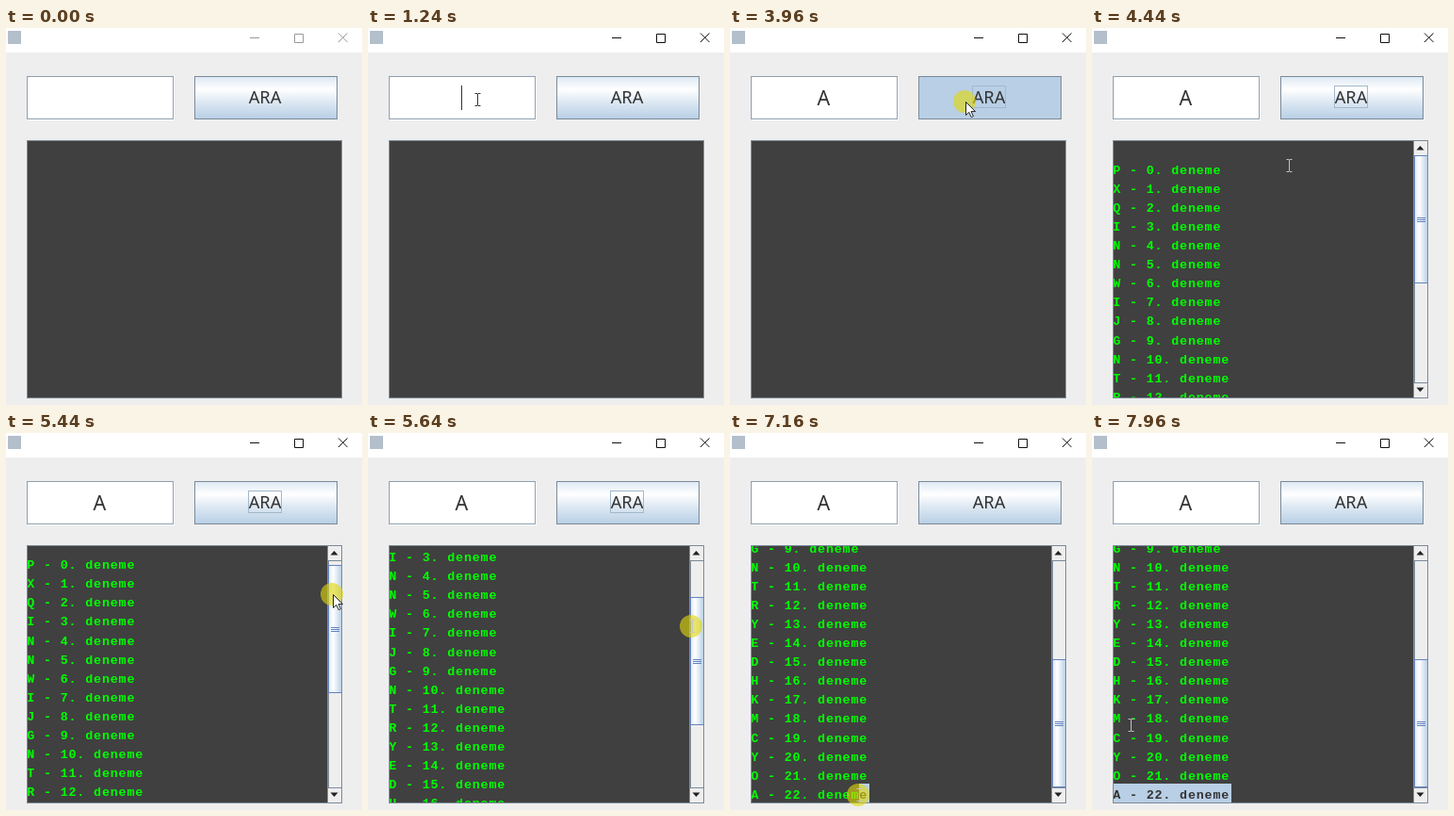
Animation of 378 by 400 pixels, one loop 8000 ms. Source, as an HTML page:

```html
<!DOCTYPE html>
<html lang="tr">
<head>
<meta charset="utf-8">
<title>ARA</title>
<style>
  html, body { margin: 0; width: 100%; height: 100%; overflow: hidden; background: #eee; }
  svg { display: block; width: 378px; height: 400px; }
  rect { shape-rendering: crispEdges; }
  text { white-space: pre; fill: #333; }
  .ui { font-family: "Noto Sans", "Open Sans", sans-serif; text-anchor: middle; }
  .log text { font: bold 13.4px "Liberation Mono", "Courier New", monospace; letter-spacing: .81px; fill: #0f0; }
  .edge { fill: none; stroke: #7a8a99; }
</style>
</head>
<body>
<svg viewBox="0 0 378 400">
  <defs>
    <linearGradient id="face" x2="0" y2="1">
      <stop offset="0" stop-color="#dde8f3"/><stop offset=".3" stop-color="#fff"/>
      <stop offset=".6" stop-color="#dde8f3"/><stop offset="1" stop-color="#b8cfe5"/>
    </linearGradient>
    <linearGradient id="thumbFace">
      <stop offset="0" stop-color="#dde8f3"/><stop offset=".35" stop-color="#fff"/>
      <stop offset="1" stop-color="#b8cfe5"/>
    </linearGradient>
    <clipPath id="view"><rect x="22" y="120" width="319" height="272"/></clipPath>
  </defs>

  <rect width="378" height="400" fill="#eee"/>
  <rect width="378" height="26" fill="#fff"/>
  <rect x="2" y="3" width="14" height="14" fill="#b4bfcc"/>
  <g id="controls" fill="none">
    <path d="M259 10.5h10M306.5 6.5h9v9h-9z"/>
    <path d="M353 5.5l9.5 9.5M362.5 5.5l-9.5 9.5"/>
  </g>

  <rect x="23.5" y="52.5" width="155" height="45" fill="none" stroke="#fff"/>
  <rect x="22.5" y="51.5" width="155" height="45" fill="#fff" stroke="#8f9fae"/>
  <text id="typed" class="ui" x="99.300" y="82" font-size="21.5">A</text>
  <rect id="caret" y="61" width="1" height="26" fill="#333"/>

  <rect id="button" x="200.5" y="51.5" width="151" height="45" stroke="#7a8a99"/>
  <rect id="rollover" x="202" y="53" width="148" height="42" fill="none" stroke="#b8cfe5" stroke-width="2"/>
  <text class="ui" x="275" y="80" font-size="18.200">ARA</text>
  <rect id="focus" x="257.5" y="61.5" width="35" height="23" fill="none" stroke="#a3b8cc"/>

  <rect x="22" y="119" width="335" height="274" fill="#404040"/>
  <g id="output">
    <g clip-path="url(#view)"><g id="log" class="log">
      <rect id="band" y="581" height="21" fill="#b8cfe5"/>
    </g></g>
    <rect x="341" y="120" width="16" height="272" fill="#eee"/>
    <path class="edge" d="M341.5 120v272M342.5 136v240M342 135.5h15M342 376.5h15"/>
    <path d="M344.5 129.5l4-4.5 4 4.5zM344.5 381.5l4 4.5 4-4.5z" fill="#222"/>
    <g id="thumb">
      <rect x="342.5" y="135.5" width="14" height="135" fill="url(#thumbFace)" stroke="#6382bf"/>
      <path d="M345 201.5h9M345 203.5h9M345 205.5h9" stroke="#6382bf"/>
    </g>
  </g>
  <rect class="edge" x="22.5" y="119.5" width="334" height="273"/>

  <g id="pointer">
    <circle id="halo" cx="-1" r="12" fill="#e0d60a" fill-opacity=".62"/>
    <path id="beam" d="M-2.5 -6.5H0l.5 .5 .5 -.5H3.5M.5 -6V6M-2.5 6.5H0l.5 -.5 .5 .5H3.5" fill="none"/>
    <path id="arrow" d="M.5 .5v14l3.300-3.100 2.400 5.200 2.200-1-2.400-5h4.500z" fill="#fff" stroke="#222"/>
  </g>
</svg>
<script>
const LOOP = 8000, STEP = 40, BLINK = 500;
const ROW = 20.1, CHAR = 8.85, LEFT = 22.3, TRAVEL = 104.5;
const ENTER = 120, ACTIVATE = 1120, TYPE = 2640, PUSH = 3960, SEARCH = 4120;
const GRAB = 5360, DROP = 6320, HOLD = 6960, MARK = 7160, FREE = 7640;
const LETTERS = 'PXQINNWIJGNTRYEDHKMCYOA';
const $ = id => document.getElementById(id);

// Each move starts where the one before it ended; a bend makes it an even-paced arc.
const START = { x: 309, y: 383 };
const MOVES = [
  { from: ENTER, to: 920, x: 116, y: 76 },
  { from: 3480, to: PUSH, x: 250, y: 78 },
  { from: 4240, to: 5160, x: 347, y: 166, bend: [-99, 78] },
  { from: GRAB - 20, to: 6240, x: 336, y: 318 },
  { from: DROP - STEP, to: HOLD, x: 142, y: 384 },
  { from: MARK - STEP, to: 7440, x: 17, y: 380 },
  { from: FREE - STEP, to: 7960, x: 41, y: 310 }
];

const clamp = (v, lo, hi) => Math.min(hi, Math.max(lo, v));
const between = (t, from, to) => t >= from && t < to;
const smooth = k => k * k * (3 - 2 * k);
const show = (id, on) => $(id).setAttribute('visibility', on ? 'inherit' : 'hidden');
const set = (id, name, value) => $(id).setAttribute(name, value);

function pointerAt(t) {
  let { x, y } = START;
  for (const move of MOVES) {
    const k = clamp((t - move.from) / (move.to - move.from), 0, 1);
    const [bendX, bendY] = move.bend || [0, 0];
    const eased = move.bend ? k : smooth(k);
    const arc = Math.sin(Math.PI * k);
    if (k > 0) {
      x += (move.x - x) * eased + bendX * arc;
      y += (move.y - y) * eased + bendY * arc;
    }
  }
  return { x, y };
}

function add(parent, tag) {
  return parent.appendChild(document.createElementNS(parent.namespaceURI, tag));
}

const lines = [...LETTERS].map((letter, i) => `${letter} - ${i}. deneme`);
const rows = lines.map((line, i) => {
  const text = add($('log'), 'text');
  text.setAttribute('x', LEFT);
  text.setAttribute('y', 154.6 + i * ROW);
  add(text, 'tspan').textContent = line;
  return text;
});
const lastLine = lines[lines.length - 1];
const plain = rows[rows.length - 1].firstChild;
const marked = add(rows[rows.length - 1], 'tspan');
marked.style.fill = '#333';

function select(from) {
  plain.textContent = lastLine.slice(0, from);
  marked.textContent = lastLine.slice(from);
  const x = from ? LEFT + from * CHAR : 22;
  set('band', 'x', x);
  set('band', 'width', from < lastLine.length ? 148 - x : 0);
}

function render(t) {
  const { x, y } = pointerAt(t);
  const overField = between(x, 22, 178) && between(y, 51, 97);
  const overButton = between(x, 200, 352) && between(y, 51, 97);
  const overLog = x < 345.5 && y >= 119;
  const buttonDown = between(t, PUSH, SEARCH);
  const typed = t >= TYPE;

  set('controls', 'stroke', t < ACTIVATE ? '#999' : '#111');
  show('typed', typed);
  const blinkTime = t - (typed ? TYPE : ACTIVATE);
  show('caret', between(t, ACTIVATE, PUSH) && blinkTime % (2 * BLINK) < BLINK);
  set('caret', 'x', typed ? 105 : 99);

  set('button', 'fill', buttonDown ? '#b8cfe5' : 'url(#face)');
  show('rollover', overButton && !buttonDown);
  show('focus', between(t, PUSH, MARK));

  show('output', t >= SEARCH);
  const drag = t < GRAB ? 0 : clamp(pointerAt(Math.min(t, DROP - STEP)).y - 166, 0, TRAVEL);
  set('thumb', 'transform', `translate(0 ${Math.round(drag)})`);
  set('log', 'transform', `translate(0 ${-2 * drag})`);
  const column = Math.round((pointerAt(Math.min(t, FREE - STEP)).x - LEFT) / CHAR);
  select(t < MARK ? lastLine.length : clamp(column, 0, lastLine.length));

  show('pointer', t >= ENTER);
  set('pointer', 'transform', `translate(${Math.round(x)} ${Math.round(y)})`);
  show('halo', between(t, ACTIVATE, 1240) || buttonDown || between(t, GRAB, DROP) || between(t, HOLD, FREE));
  show('beam', overField || overLog);
  show('arrow', !overField && !overLog);
  set('beam', 'stroke', overField ? '#333' : '#c4c4c4');
}

function frame() {
  const t = performance.now() % LOOP;
  render(Math.floor(t / STEP) * STEP);
  requestAnimationFrame(frame);
}
frame();
</script>
</body>
</html>
```
